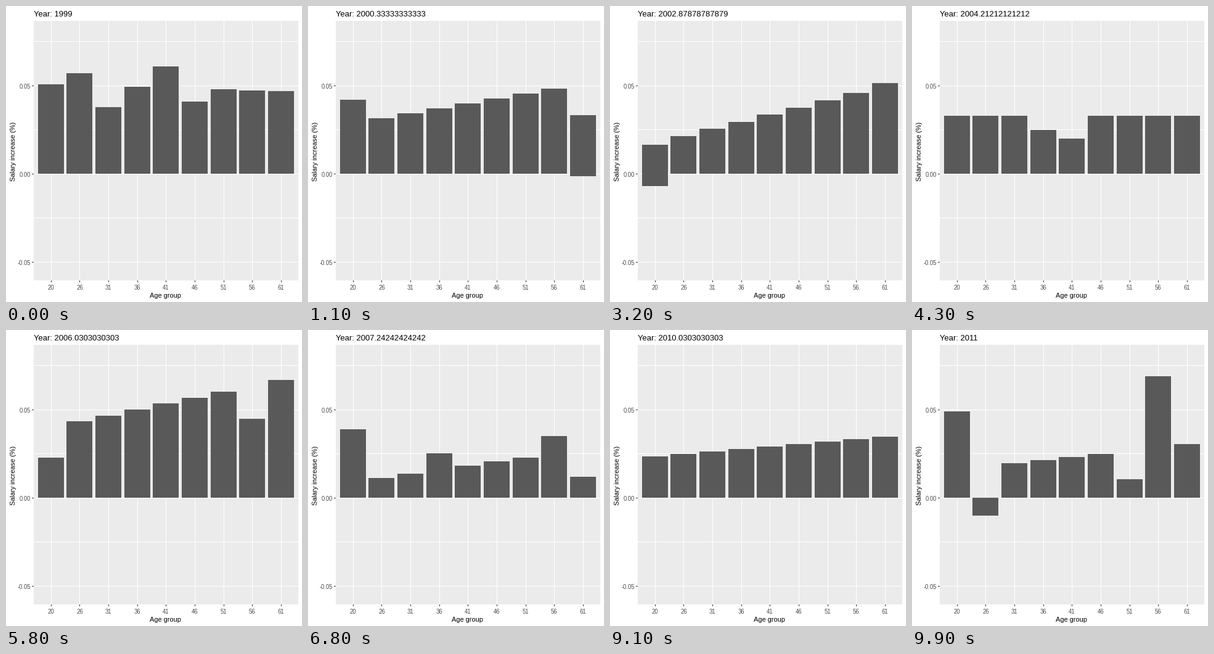
These frames come from a looping animation (480x480 px, 10 s). A matplotlib script:

```python
import numpy as np
import matplotlib.pyplot as plt
from matplotlib.animation import FuncAnimation
from matplotlib.patches import Rectangle

SIZE, FRAMES, INTERVAL = 480, 100, 100
LEFT, TOP, RIGHT, BOTTOM = 45, 24, 474, 445
ZERO, UNIT = 272.4, 143 / 0.05  # pixel row of zero, pixels per 1.0
AGES = [20, 26, 31, 36, 41, 46, 51, 56, 61]
FIRST, LAST = 1999, 2011

# Percent for the youngest and oldest group, and the ages that break the trend
TRENDS = {
    1999: (5.1, 4.7, {26: 5.7, 31: 3.8, 41: 6.1, 46: 4.1}),
    2001: (1.8, 5.3, {20: 5.7, 61: -0.33}),
    2002: (0.6, 6.7, {20: -5.36, 61: 7.97}),
    2004: (3.2, 2.8, {36: 2.0, 41: 1.3}),
    2006: (4.0, 6.7, {20: 2.3, 56: 4.5}),
    2007: (0.6, 2.6, {20: 4.6, 36: 2.6, 56: 3.65, 61: 0.5}),
    2009: (3.1, 3.9, {20: 0.86, 36: 4.5, 51: 8.0}),
    2011: (1.6, 3.05, {20: 4.9, 26: -1.0, 51: 1.07, 56: 6.9}),
}


def raises(year):
    """Straight line over the age groups, plus that year's exceptions."""
    young, old = (np.interp(year, list(TRENDS), [t[end] for t in TRENDS.values()])
                  for end in (0, 1))
    line = np.linspace(young, old, len(AGES))
    odd = TRENDS[year][2] if year in TRENDS else {}
    return [odd.get(age, value) / 100 for age, value in zip(AGES, line)]


years = np.arange(FIRST, LAST + 1)
data = np.array([raises(year) for year in years])

# Each year lands on a whole frame; bar ends glide linearly in between
keys = np.round((years - FIRST) * (FRAMES - 1) / (LAST - FIRST) + 1) - 1


def to_y(value):
    return ZERO - value * UNIT


def bar_ends(values):
    cols = [np.interp(np.arange(FRAMES), keys, col) for col in values.T]
    return np.round(to_y(np.array(cols).T))


tops = bar_ends(np.maximum(data, 0))
bottoms = bar_ends(np.minimum(data, 0))

plt.rcParams["font.family"] = "Liberation Sans"
fig = plt.figure(figsize=(SIZE / 72, SIZE / 72), dpi=72, facecolor="white")
ax = fig.add_axes([0, 0, 1, 1])
ax.set_xlim(0, SIZE)
ax.set_ylim(SIZE, 0)
ax.axis("off")


def rect(x0, y0, x1, y1, color, **kw):
    return ax.add_patch(Rectangle((x0, y0), x1 - x0, y1 - y0, facecolor=color,
                                  linewidth=0, antialiased=False, **kw))


def label(x, y, text, size, color="black", ha="center", **kw):
    return ax.text(x, y, text, fontsize=size, color=color, ha=ha, va="baseline", **kw)


rect(LEFT, TOP, RIGHT, BOTTOM, "#EBEBEB")

for value in np.arange(-0.05, 0.08, 0.025):
    y = int(to_y(value))
    rect(LEFT, y, RIGHT, y + 1, "white")

for value in (-0.05, 0, 0.05):
    y = int(to_y(value))
    rect(LEFT - 3, y, LEFT, y + 1, "#333333")
    label(40.5, y + 5, f"{value:.2f}", 9.5, "#4D4D4D", ha="right")

slot = (RIGHT - LEFT) / (len(AGES) + 0.2)
bars = []
for i, age in enumerate(AGES):
    mid = LEFT - 0.2 + (i + 0.6) * slot
    x = round(mid)
    rect(x, TOP, x + 1, BOTTOM, "white")
    rect(x, BOTTOM, x + 1, BOTTOM + 3, "#333333")
    label(mid, 459.5, str(age), 9.5, "#4D4D4D")
    bars.append(rect(round(mid - 0.45 * slot), ZERO, round(mid + 0.45 * slot), ZERO,
                     "#595959", zorder=2))

label((LEFT + RIGHT) / 2 - 1, 473, "Age group", 11)
label(15, (TOP + BOTTOM) / 2 + 1, "Salary increase (%)", 11,
      rotation=90, rotation_mode="anchor")
title = label(LEFT, 17, "", 13, ha="left")


def draw(frame):
    year = FIRST + (LAST - FIRST) * frame / (FRAMES - 1)
    title.set_text(f"Year: {year:.15g}")
    for bar, top, bottom in zip(bars, tops[frame], bottoms[frame]):
        bar.set_y(top)
        bar.set_height(bottom - top)
    return [title, *bars]


anim = FuncAnimation(fig, draw, frames=FRAMES, interval=INTERVAL, repeat=True,
                     repeat_delay=0, blit=False)
plt.show()
```
